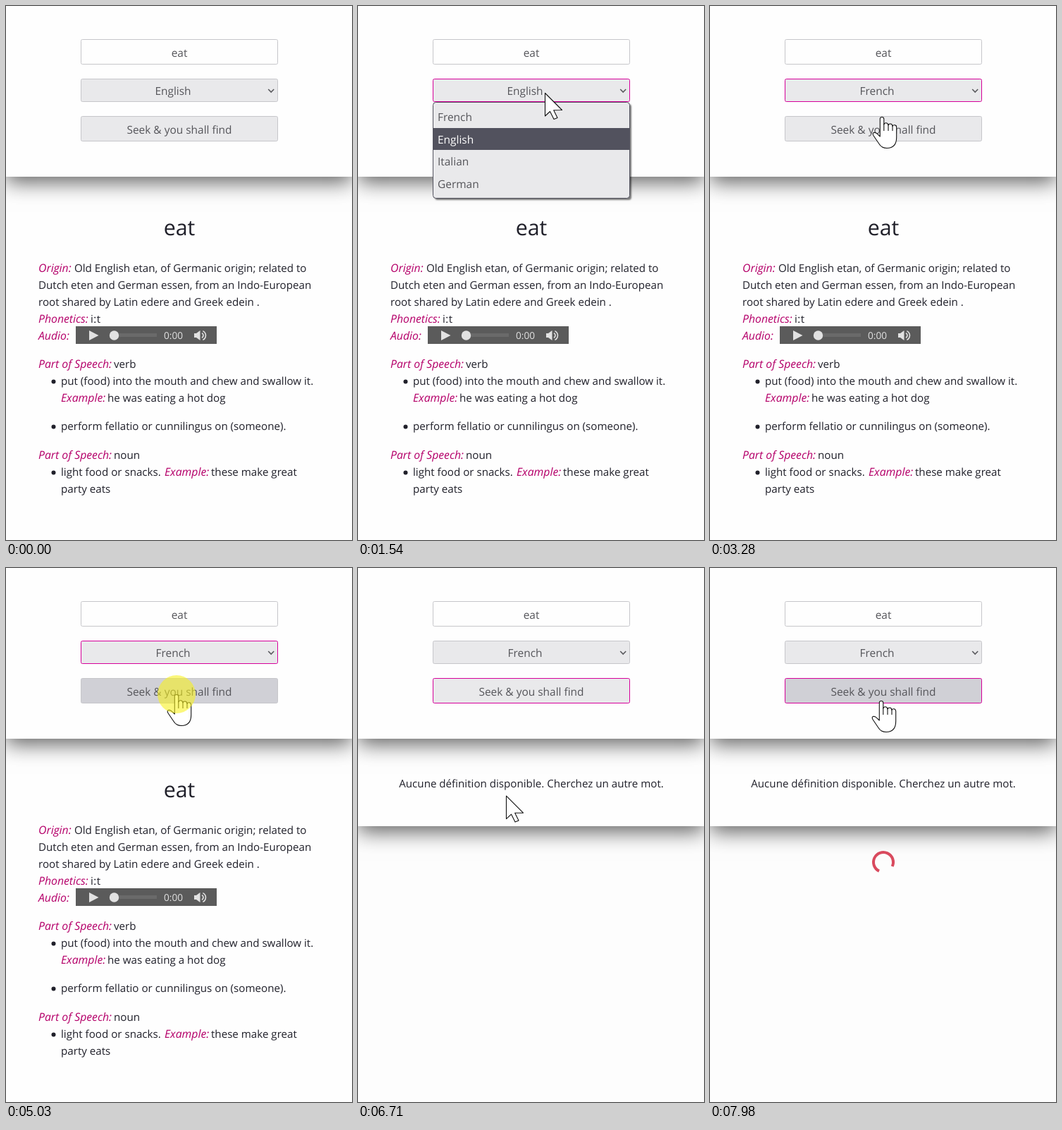
Write an HTML page with a canvas that moves like this. It is 491x757 px and loops after 8000 ms.

```html
<!DOCTYPE html>
<html lang="en">
<head>
<meta charset="utf-8">
<title>Dictionary search</title>
<style>
html, body { margin: 0; width: 100%; height: 100%; overflow: hidden; background: #fdfdfd; }
canvas { display: block; width: 491px; height: 757px; }
</style>
</head>
<body>
<canvas id="stage"></canvas>
<script>
const W = 491, H = 757, LOOP = 8000;
const canvas = document.getElementById('stage');
const ctx = canvas.getContext('2d');
const dpr = window.devicePixelRatio || 1;
canvas.width = W * dpr;
canvas.height = H * dpr;
ctx.textRendering = 'geometricPrecision';

const FAMILY = '"Open Sans", "Noto Sans", sans-serif';
const INK = '#20202a', SOFT = '#55555a', PINK = '#d6009a', LABEL = '#b5006a';
const DARK = '#52525e', FIELD = '#e9e9eb', EDGE = '#c6c6ca';
const BODY_SIZE = 15.15, LABEL_SIZE = 15.8, FORM_SIZE = 15.45;

// Pointer stops: time, x, y of the tip
const PATH = [
  [420, 423, 701], [1030, 265, 123], [2000, 265, 123], [2220, 253, 141],
  [3210, 253, 141], [3280, 244, 157], [3690, 244, 157], [3950, 242, 179],
  [6360, 242, 179], [6640, 208, 333], [7110, 240, 164], [7190, 240, 164],
  [7580, 243, 176], [7850, 243, 176], [7970, 243, 188]
];
const CLICKS = [[1340, 1540], [3150, 3280], [5030, 5230], [7730, 7930]];
const HOVERS = [[3290, 6410], [6970, LOOP + 500]];
const LANGS = ['French', 'English', 'Italian', 'German'];

const clamp = v => Math.max(0, Math.min(1, v));
const smooth = p => p * p * (3 - 2 * p);
const within = (t, [a, b]) => t >= a && t < b;

function pointerAt(t) {
  if (t < PATH[0][0]) return null;
  const next = PATH.findIndex(k => k[0] > t);
  if (next < 0) return PATH[PATH.length - 1].slice(1);
  const [t0, x0, y0] = PATH[next - 1], [t1, x1, y1] = PATH[next];
  const p = smooth((t - t0) / (t1 - t0));
  return [x0 + (x1 - x0) * p, y0 + (y1 - y0) * p];
}

function text(str, x, y, { color = INK, size = BODY_SIZE, italic = false, align = 'left' } = {}) {
  ctx.font = `${italic ? 'italic ' : ''}${size}px ${FAMILY}`;
  ctx.fillStyle = color;
  ctx.textAlign = align;
  ctx.fillText(str, x, y);
}

const label = (str, x, y) => text(str, x, y, { color: LABEL, size: LABEL_SIZE, italic: true });

function dot(x, y, r, color) {
  ctx.fillStyle = color;
  ctx.beginPath();
  ctx.arc(x, y, r, 0, Math.PI * 2);
  ctx.fill();
}

function polygon(points) {
  ctx.beginPath();
  points.forEach(([x, y]) => ctx.lineTo(x, y));
  ctx.closePath();
}

function panel(y, h) {
  ctx.save();
  ctx.shadowColor = 'rgba(0,0,0,.62)';
  ctx.shadowBlur = 28 * dpr;
  ctx.shadowOffsetY = 8 * dpr;
  ctx.fillStyle = '#fefefe';
  ctx.fillRect(0, y, W, h);
  ctx.restore();
}

function box(y, h, fill, focused = false) {
  ctx.beginPath();
  ctx.roundRect(106.5, y + .5, 279, h - 1, 2);
  ctx.fillStyle = fill;
  ctx.fill();
  ctx.strokeStyle = focused ? PINK : EDGE;
  ctx.lineWidth = 1;
  ctx.stroke();
}

function drawForm(t) {
  const mid = { color: SOFT, size: FORM_SIZE, align: 'center' };
  const hover = Math.max(...HOVERS.map(([a, b]) => clamp((t - a) / 170) - clamp((t - b) / 170)));
  const shade = (a, b) => Math.round(a + (b - a) * hover);

  box(47, 36, '#fefefe');
  text('eat', 246, 72, mid);

  box(103, 33, FIELD, within(t, [1410, 5170]));
  text(t < 3210 ? 'English' : 'French', 237, 126, mid);
  ctx.strokeStyle = '#5a5a5e';
  ctx.lineWidth = 1.6;
  ctx.beginPath();
  ctx.moveTo(372.2, 118);
  ctx.lineTo(376.2, 122);
  ctx.lineTo(380.2, 118);
  ctx.stroke();

  const grey = shade(233, 208);
  box(156, 36, `rgb(${grey},${grey},${shade(235, 214)})`, t >= 5170);
  text('Seek & you shall find', 246, 181, mid);
}

function drawMenu(active) {
  ctx.save();
  ctx.shadowColor = 'rgba(0,0,0,.5)';
  ctx.shadowBlur = 2 * dpr;
  ctx.shadowOffsetX = ctx.shadowOffsetY = 2.5 * dpr;
  ctx.fillStyle = FIELD;
  ctx.beginPath();
  ctx.roundRect(106.5, 136.5, 279, 136, 4);
  ctx.fill();
  ctx.restore();
  ctx.strokeStyle = DARK;
  ctx.lineWidth = 1;
  ctx.stroke();
  LANGS.forEach((name, i) => {
    const y = 141.3 + i * 31.7;
    if (i === active) {
      ctx.fillStyle = DARK;
      ctx.fillRect(107, Math.round(y), 278, 31);
    }
    text(name, 113, Math.round(y + 21.7), { color: i === active ? '#fff' : SOFT, size: FORM_SIZE });
  });
}

function drawAudio() {
  const light = '#e2e2e2';
  ctx.fillStyle = '#5b5b5b';
  ctx.fillRect(99, 454, 200, 25);
  ctx.fillStyle = light;
  polygon([[118, 460], [131.5, 467], [118, 474]]);
  ctx.fill();
  ctx.fillStyle = '#6a6a6a';
  ctx.fillRect(147, 464, 67, 5);
  dot(153.5, 467, 6.7, light);
  text('0:00', 224, 472, { color: light, size: 13.6 });
  ctx.fillStyle = light;
  polygon([[267, 464], [270, 464], [275.5, 460], [275.5, 474], [270, 470], [267, 470]]);
  ctx.fill();
  ctx.strokeStyle = light;
  ctx.lineWidth = 1.6;
  [3.5, 7].forEach(r => {
    ctx.beginPath();
    ctx.arc(276.5, 467, r, -1.15, 1.15);
    ctx.stroke();
  });
}

function drawEntry() {
  text('eat', 246, 325, { size: 30.4, align: 'center' });
  label('Origin:', 46, 377);
  text('Old English etan, of Germanic origin; related to', 97, 377);
  text('Dutch eten and German essen, from an Indo-European', 46, 401);
  text('root shared by Latin edere and Greek edein .', 46, 425);
  label('Phonetics:', 46, 449);
  text('iːt', 120, 449);
  label('Audio:', 46, 473);
  drawAudio();
  label('Part of Speech:', 46, 513);
  text('verb', 153, 513);
  text('put (food) into the mouth and chew and swallow it.', 78, 537);
  label('Example:', 78, 561);
  text('he was eating a hot dog', 144, 561);
  text('perform fellatio or cunnilingus on (someone).', 78, 601);
  label('Part of Speech:', 46, 642);
  text('noun', 153, 642);
  text('light food or snacks.', 78, 666);
  label('Example:', 225, 666);
  text('these make great', 291, 666);
  text('party eats', 78, 690);
  [532.5, 596.5, 661.5].forEach(y => dot(67.5, y, 3, INK));
}

function drawSpinner(t) {
  const start = (115 + (t - 7980) * .3) * Math.PI / 180;
  ctx.strokeStyle = '#d94a5e';
  ctx.lineWidth = 4;
  ctx.beginPath();
  ctx.arc(246, 417, 14, start, start + Math.PI * 1.5);
  ctx.stroke();
}

function drawArrow() {
  polygon([[.5, .5], [.5, 33], [7.5, 26.5], [13, 37.5], [18, 35.5], [12.7, 24.7], [24.5, 24.5]]);
  ctx.fill();
  ctx.stroke();
}

const HAND = new Path2D('M-2.7 28V3.2Q-2.7.5 0 .5T2.8 3.2V11Q3.3 8.8 5.8 8.8T9 12' +
  'Q9.5 10 12 10T15 13.3Q15.6 11.6 18 11.8T20.7 15V29Q20.7 44.5 7 44.5' +
  'Q-.5 44.5-4 38.5L-11.8 27Q-14 23.5-11.5 22.6T-6 24.8Z');
const KNUCKLES = new Path2D('M2.8 10V20M9 11.5V20M15 12.5V20');

function drawHand() {
  ctx.fill(HAND);
  ctx.stroke(HAND);
  ctx.stroke(KNUCKLES);
}

function drawPointer(t) {
  const at = pointerAt(t);
  if (!at) return;
  const [x, y] = at;
  const menuOpen = within(t, [1410, 3210]);
  const onButton = !menuOpen && y >= 156 && y < 192 && x > 106 && x < 386;
  ctx.save();
  ctx.translate(x, y);
  ctx.fillStyle = '#fff';
  ctx.strokeStyle = '#111';
  ctx.lineWidth = 1.1;
  ctx.lineJoin = 'round';
  (onButton ? drawHand : drawArrow)();
  ctx.restore();
  if (CLICKS.some(c => within(t, c))) dot(x, y, 27, 'rgba(248,242,30,.58)');
}

function draw(t) {
  const found = t < 5300;
  ctx.setTransform(dpr, 0, 0, dpr, 0, 0);
  ctx.fillStyle = '#fdfdfd';
  ctx.fillRect(0, 0, W, H);
  panel(242, found ? 560 : 124);
  panel(-40, 282);
  if (found) drawEntry();
  else text('Aucune définition disponible. Cherchez un autre mot.', 246, 311, { align: 'center' });
  drawForm(t);
  if (within(t, [1410, 3210])) drawMenu(t < 2100 ? 1 : 0);
  if (t >= 7850) drawSpinner(t);
  drawPointer(t);
}

function tick() {
  draw(performance.now() % LOOP);
  requestAnimationFrame(tick);
}
tick();
</script>
</body>
</html>
```
